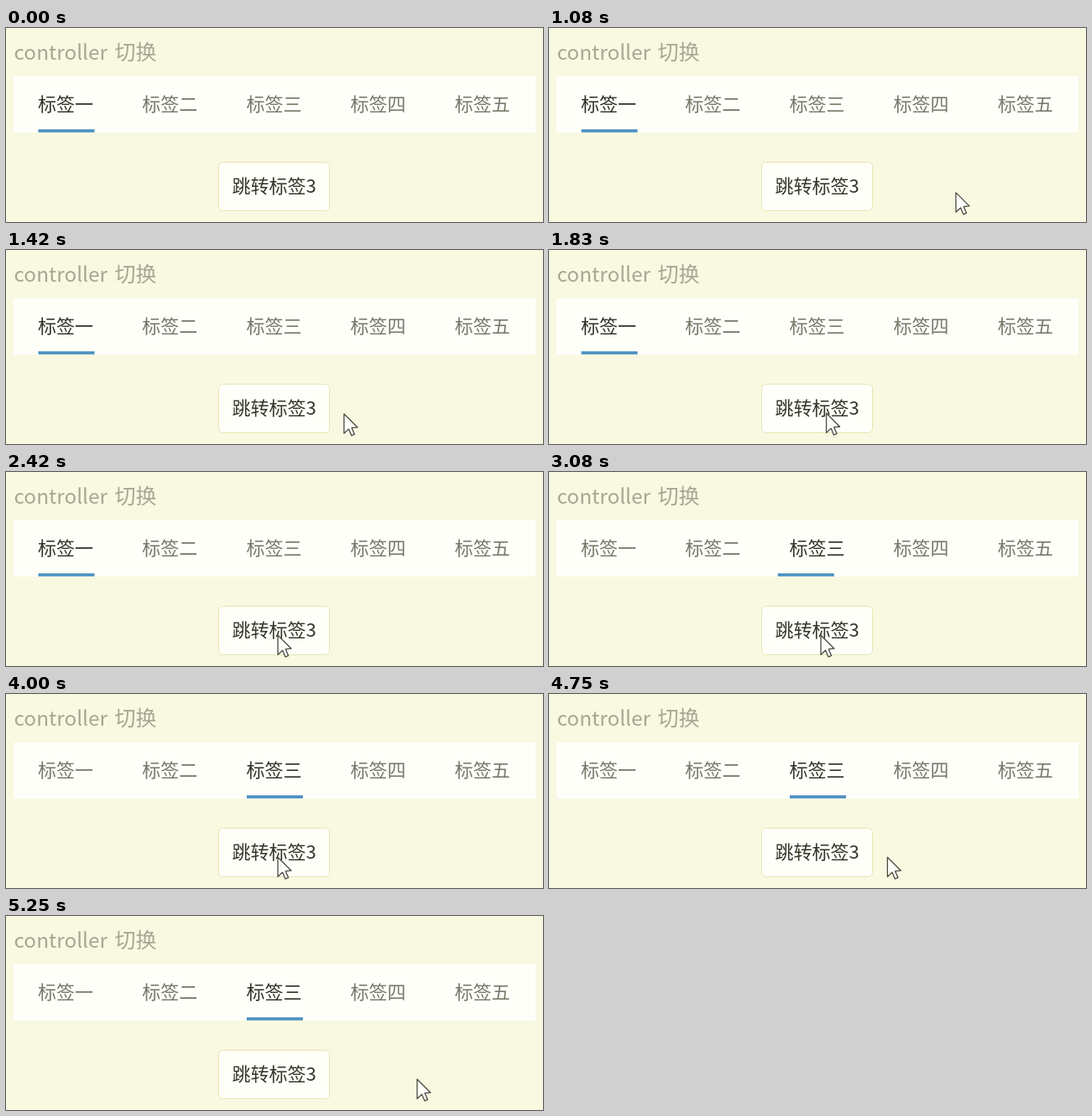
Recreate the animation shown at these times as an HTML page. Size 640 by 232 pixels, loop 5.33 s.

```html
<!DOCTYPE html>
<html lang="zh-CN">
<head>
<meta charset="utf-8">
<style>
  html, body { margin: 0; width: 100%; height: 100%; overflow: hidden; background: #f9f9e2; }
  svg { display: block; width: 640px; height: 232px; }
  text { font-family: "Noto Sans CJK SC", "Noto Sans CJK", "Noto Sans CJK JP", sans-serif; font-size: 22px; }
  .title { font-size: 24.4px; }
  .title tspan { font-size: 25px; }
</style>
</head>
<body>
<svg viewBox="0 0 640 232" xmlns="http://www.w3.org/2000/svg">
  <rect width="640" height="232" fill="#f9f9e2"/>
  <text class="title" x="9.5" y="38.3" fill="#a6a694">controller <tspan x="129.5">切换</tspan></text>
  <rect x="9" y="58" width="622" height="67" fill="#fffffa"/>
  <g id="tabs"></g>
  <rect id="line" y="121.2" width="67" height="3.6" fill="#4a90c2"/>
  <rect id="button" x="253.5" y="160.5" width="132" height="58" rx="5"/>
  <text x="319.5" y="197" text-anchor="middle" fill="#35352a">跳转标签3</text>
  <path id="cursor" d="M.7 .7V24L6.3 18.8L9.6 26.6L13.2 25.1L9.9 17.4L16.7 16.7Z"
        fill="#fffffa" stroke="#4a4a42" stroke-width="1.3" stroke-linejoin="round"/>
</svg>
<script>
const LOOP = 5330, STEP = LOOP / 64, PITCH = 124.2;
const ENTER = 660, ARRIVE = 1917, PRESS = 2580, SWITCH = 2870, RELEASE = 2910, LEAVE = 4500;
const SLIDE = 300;
const $ = id => document.getElementById(id);
const mix = (a, b, k) => a + (b - a) * k;
const progress = (t, from, to) => Math.min(1, Math.max(0, (t - from) / (to - from)));
const easeOut = (p, power) => 1 - (1 - p) ** power;

const tabs = [..."一二三四五"].map((c, i) => {
  const tab = document.createElementNS("http://www.w3.org/2000/svg", "text");
  tab.setAttribute("x", 38 + i * PITCH);
  tab.setAttribute("y", 99.3);
  tab.textContent = "标签" + c;
  $("tabs").append(tab);
  return tab;
});

// CSS "ease": cubic-bezier(.25, .1, .25, 1)
function ease(p) {
  const bez = (u, a, b) => 3 * u * (1 - u) ** 2 * a + 3 * u * u * (1 - u) * b + u ** 3;
  let lo = 0, hi = 1;
  for (let i = 0; i < 20; i++) {
    const mid = (lo + hi) / 2;
    if (bez(mid, .25, .25) < p) lo = mid; else hi = mid;
  }
  return bez(lo, .1, 1);
}

function drawTabs(t) {
  const active = t < SWITCH ? 0 : 2;
  tabs.forEach((tab, i) => tab.setAttribute("fill", i === active ? "#33332a" : "#78786a"));
  $("line").setAttribute("x", 38.5 + 2 * PITCH * ease(progress(t, SWITCH, SWITCH + SLIDE)));
}

function drawButton(t) {
  const pressed = t >= PRESS && t < RELEASE;
  $("button").setAttribute("fill", pressed ? "#e9e9bf" : "#fffffa");
  $("button").setAttribute("stroke", pressed ? "#dedeb6" : "#e6e6b0");
}

function drawCursor(t) {
  const come = easeOut(progress(t, ENTER, ARRIVE), 1.4);
  const go = easeOut(progress(t, LEAVE, LOOP), 1.8);
  const x = mix(mix(609, 323.3, come), 492, go);
  const y = mix(197.5, 194.5, come);
  $("cursor").setAttribute("visibility", t < ENTER ? "hidden" : "visible");
  $("cursor").setAttribute("transform", `translate(${x} ${y})`);
}

function draw(ms) {
  // The picture advances in 64 even steps per loop.
  const t = Math.floor((ms % LOOP + 5) / STEP) % 64 * STEP;
  drawTabs(t);
  drawButton(t);
  drawCursor(t);
}

const start = performance.now();
function tick() {
  draw(performance.now() - start);
  requestAnimationFrame(tick);
}
tick();
</script>
</body>
</html>
```
